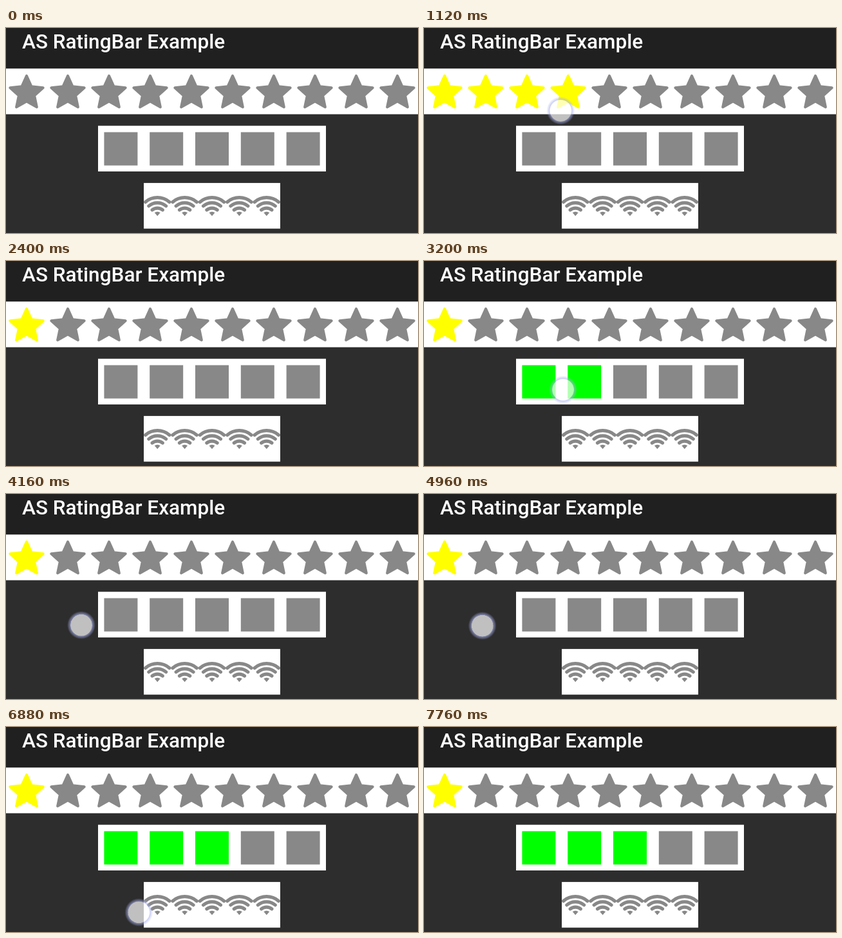
Recreate the animation shown at these times as an HTML page. Size 640 px wide and 320 px high, loop 8480 ms.

```html
<!DOCTYPE html>
<html lang="en">
<head>
<meta charset="utf-8">
<title>AS RatingBar Example</title>
<style>
  html, body { margin: 0; width: 100%; height: 100%; overflow: hidden; background: #2d2d2d; }
  svg { display: block; width: 640px; height: 320px; }
  text { font: 500 31.5px Roboto, sans-serif; fill: #fff; }
  .icon { fill: #888; stroke: #888; }
  .icon.on { fill: var(--on); stroke: var(--on); }
  .wave { fill: none; stroke-width: 5.2; stroke-linecap: round; }
</style>
</head>
<body>
<svg viewBox="0 0 640 320">
  <defs>
    <radialGradient id="glow">
      <stop offset=".74" stop-color="#a9b0ee" stop-opacity="0"/>
      <stop offset=".79" stop-color="#a9b0ee" stop-opacity=".6"/>
      <stop offset="1" stop-color="#a9b0ee" stop-opacity="0"/>
    </radialGradient>
  </defs>
  <rect width="640" height="320" fill="#2d2d2d"/>
  <rect width="640" height="64" fill="#202020"/>
  <text x="25" y="32.2">AS RatingBar Example</text>
  <g id="bars"></g>
  <g id="touch">
    <circle r="17" fill="#fff" fill-opacity=".7"/>
    <circle r="22" fill="url(#glow)"/>
  </g>
</svg>
<script>
const LOOP = 8480, STEP = 80;

// Icons are drawn around the centre of their cell's top edge.
function star() {
  const points = Array.from({ length: 10 }, (_, i) => {
    const r = i % 2 ? 12.8 : 27, a = i * Math.PI / 5;
    return [r * Math.sin(a), 38.3 - r * Math.cos(a)];
  });
  return `<polygon points="${points.join(' ')}" stroke-width="4" stroke-linejoin="round"/>`;
}

const block = () => '<rect x="-26" y="10" width="52" height="52" stroke="none"/>';

function wifi() {
  const base = 51.6;
  const arc = r => {
    const x = r * Math.sin(.71), y = base - r * Math.cos(.71);
    return `M${-x} ${y}A${r} ${r} 0 0 1 ${x} ${y}`;
  };
  return `<path class="wave" d="${[12.4, 20.6, 28.8].map(arc).join('')}"/>` +
    `<path stroke="none" d="${arc(6.8)}L0 ${base}Z"/>`;
}

// turns: [time, x] where the finger changes direction; it lifts at the last one.
const bars = [
  { n: 10, cell: 64, color: '#ff0', icon: star, fingerY: x => 95 + .16 * x,
    turns: [[960, 34], [1360, 550], [2080, 35]] },
  { n: 5, cell: 70.8, color: '#0f0', icon: block, fingerY: x => 209 - .037 * x,
    turns: [[2480, 165], [2640, 532], [3600, 30], [4160, 117], [4480, 330], [4880, 82], [5520, 310]] },
  { n: 5, cell: 42.4, color: '#0f0', icon: wifi, fingerY: x => 279 + .05 * x,
    turns: [[5920, 238], [6480, 467], [7120, 90], [7600, 190]] }
];

const layer = document.getElementById('bars');
const touch = document.getElementById('touch');

bars.forEach((b, row) => {
  const width = b.n * b.cell, y = 63.3 + 89.3 * row;
  b.x = 320 - width / 2;
  const icons = Array.from({ length: b.n }, (_, i) =>
    `<g class="icon" transform="translate(${b.x + b.cell * (i + .5)} ${y})">${b.icon()}</g>`);
  layer.innerHTML += `<g style="--on: ${b.color}">
    <rect x="${b.x}" y="${y}" width="${width}" height="71.3" fill="#fff"/>${icons.join('')}</g>`;
});
bars.forEach((b, row) => b.icons = layer.children[row].querySelectorAll('.icon'));

// Cosine ease from one turn to the next.
function fingerX(turns, t) {
  const next = turns.findIndex(turn => turn[0] > t);
  if (next < 0) return turns.at(-1)[1];
  const [t0, x0] = turns[next - 1], [t1, x1] = turns[next];
  return x0 + (x1 - x0) * (1 - Math.cos(Math.PI * (t - t0) / (t1 - t0))) / 2;
}

function draw(now) {
  const t = Math.floor(now % LOOP / STEP) * STEP;
  let alpha = 0;
  for (const b of bars) {
    const start = b.turns[0][0], end = b.turns.at(-1)[0];
    const x = t < start ? 0 : fingerX(b.turns, t);
    const rating = Math.ceil((x - b.x) / b.cell);
    b.icons.forEach((icon, i) => icon.classList.toggle('on', i < rating));
    if (t >= start && t <= end + STEP) {
      alpha = t > end ? .5 : 1;
      touch.setAttribute('transform', `translate(${x} ${b.fingerY(x)})`);
    }
  }
  touch.setAttribute('opacity', alpha);
  requestAnimationFrame(draw);
}
requestAnimationFrame(draw);
</script>
</body>
</html>
```
